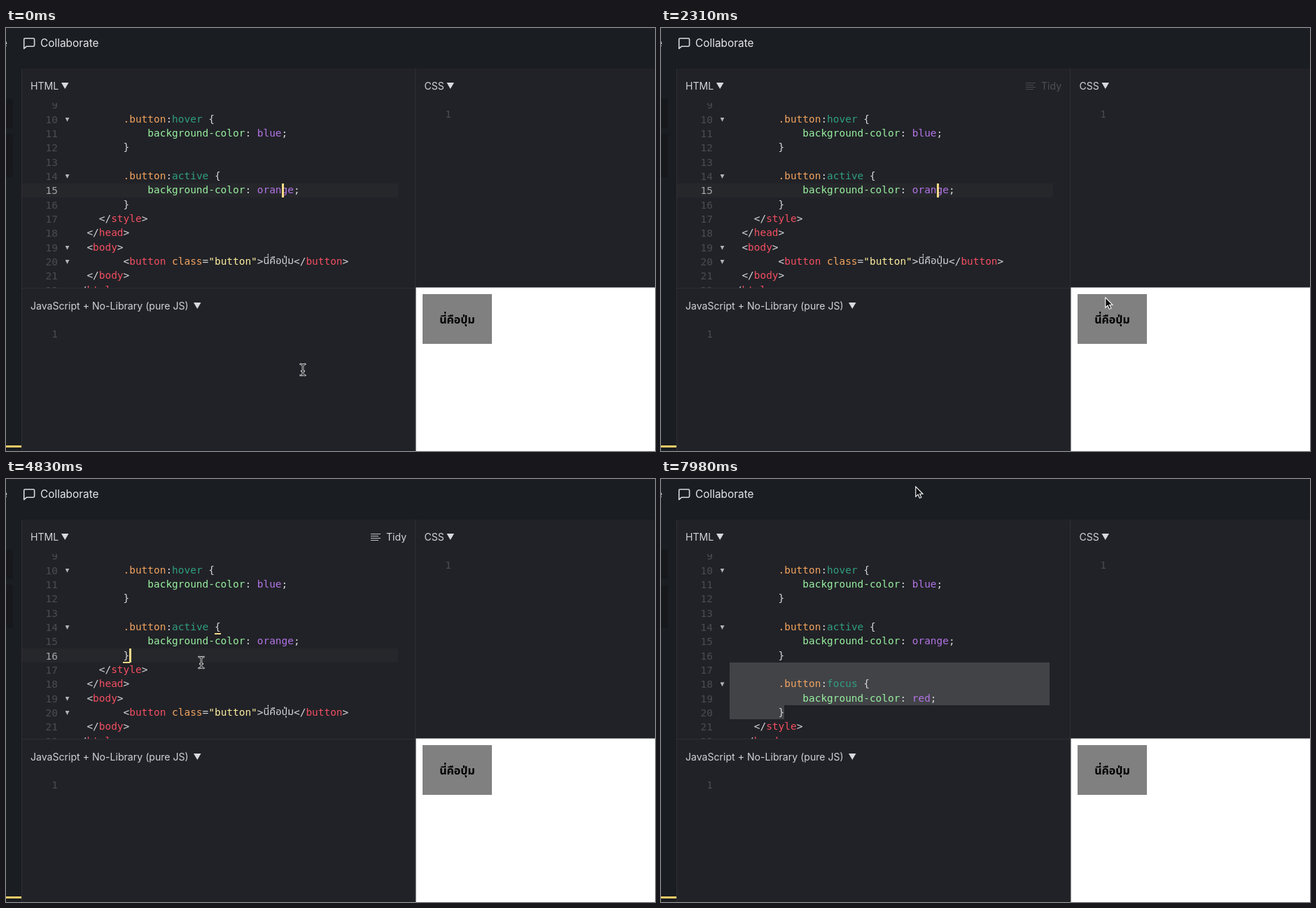
Recreate the animation shown at these times as an HTML page. Size 927 by 604 pixels, loop 8000 ms.

```html
<!DOCTYPE html>
<html lang="en">
<head>
<meta charset="utf-8">
<title>Button states in a code editor</title>
<style>
  html, body { margin: 0; width: 100%; height: 100%; overflow: hidden; background: #1a1d21; }
  #stage { position: relative; width: 927px; height: 604px; overflow: hidden; background: #1a1d21;
    font: 14.1px/20px Inter, "Open Sans", sans-serif; color: #d2d3d7; }
  #stage div, #stage svg { position: absolute; }
  .pane { background: #212227; }
  .rule { background: #2e2f34; }
  .label { white-space: pre; }
  .code, .num { font: 14.44px/20.33px "DejaVu Sans Mono", monospace; white-space: pre; }
  .code { left: 98px; color: #d4d5d9; }
  .num { width: 30px; text-align: right; color: #4b4c51; }
  .num.on { color: #a3a4a8; }
  .clip { left: 0; top: 0; width: 927px; height: 604px; clip-path: inset(107px 343px 233px 23px); }
  .sel { color: #f3a45f; }
  .pse { color: #2f9f83; }
  .prop { color: #98f0a0; }
  .val { color: #b274e6; }
  .tag { color: #f44f62; }
  .str { color: #ffeea0; }
  .thai { font-family: "Noto Sans Thai Looped", "Noto Sans Thai", "Noto Sans", sans-serif; }
  .code .thai { display: inline-block; width: 43.5px; height: 20px; line-height: 20px;
    vertical-align: top; font-size: 14.4px; position: relative; }
  .gold { background: #f8da88; }
  .shade { background: #424347; }
  #button { left: 595px; top: 380px; width: 99px; height: 71px; line-height: 73px;
    text-align: center; color: #000; font-size: 16px; font-weight: 600; }
</style>
</head>
<body>
<div id="stage">
  <div class="label" style="left:-7px;top:12px;font-size:15.4px">e</div>
  <svg width="60" height="58" style="left:0;top:0" fill="none" stroke="#d8d9dc" stroke-width="1.6" stroke-linejoin="round">
    <path d="M27.3 14.8H39Q40.6 14.8 40.6 16.4V24.6Q40.6 26.2 39 26.2H29.6L25.7 29.4V16.4Q25.7 14.8 27.3 14.8Z"/>
  </svg>
  <div class="label" style="left:49px;top:12px;font-size:15.4px;color:#e6e7e9">Collaborate</div>

  <div style="left:-6px;top:101px;width:16px;height:42px;border-radius:4px;background:#16181b"></div>
  <div style="left:-6px;top:151px;width:16px;height:62px;border-radius:4px;background:#16181b"></div>
  <div style="left:0;top:596px;width:22px;height:3px;background:#f3cb66"></div>

  <div class="pane" style="left:23px;top:58px;width:904px;height:546px"></div>
  <div class="rule" style="left:22px;top:58px;width:1px;height:546px"></div>
  <div class="rule" style="left:584px;top:58px;width:1px;height:546px"></div>
  <div class="rule" style="left:22px;top:371px;width:563px;height:1px"></div>

  <div class="label" style="left:35px;top:73px">HTML</div>
  <div class="label" style="left:597.5px;top:73px">CSS</div>
  <div class="label" style="left:35px;top:387px">JavaScript + No-Library (pure JS)</div>
  <svg width="927" height="604" style="left:0;top:0" fill="#d8d9dc">
    <path d="M79 78h10.5l-5.25 9zM629.5 78h10.5l-5.25 9zM268 392h10.5l-5.25 9z"/>
  </svg>
  <div id="tidy">
    <svg width="16" height="12" style="left:521px;top:77px" stroke="#c2c3c7" stroke-width="1.2">
      <path d="M0 1.5h14M0 4.5h11M0 7.5h14M0 10.5h11"/>
    </svg>
    <div class="label" style="left:543px;top:73px">Tidy</div>
  </div>
  <div class="num" style="left:44px;top:427px">1</div>
  <div class="num" style="left:606px;top:113px">1</div>

  <div class="clip" id="editor">
    <div id="active" style="left:23px;width:537px;height:20px;background:#26272b"></div>
    <div id="selection">
      <div class="shade" style="left:98px;top:262px;width:457px;height:60.5px"></div>
      <div class="shade" style="left:98px;top:322px;width:78px;height:21px"></div>
    </div>
    <div id="common"></div>
    <div id="before"></div>
    <div id="after"></div>
    <div id="brackets">
      <div class="gold" style="left:298px;top:219.5px;width:9px;height:2px"></div>
      <div class="gold" style="left:167px;top:260.5px;width:9.5px;height:2px"></div>
    </div>
    <div id="caret" class="gold" style="width:3px;height:20px"></div>
  </div>

  <svg width="927" height="604" style="left:0;top:0"><path d="M585.5 370.5H927V604H585.5Z" fill="#fff"/></svg>
  <div id="button"><span class="thai">นี่คือปุ่ม</span></div>

  <svg id="ring" width="48" height="48" viewBox="-24 -24 48 48" style="left:623.5px;top:395.5px" fill="none">
    <circle r="21" stroke="#fff" stroke-opacity=".55" stroke-width="4"/>
    <circle r="21" stroke="#15151a" stroke-width="1.8"/>
  </svg>
  <svg id="arrow" width="14" height="20" style="left:0;top:0">
    <path d="M.8 .9V15.2L4.1 12.2L6.4 17.4L8.9 16.3L6.6 11.3H11Z" fill="#0c0c0e" stroke="#fff" stroke-width="1.1"/>
  </svg>
  <svg id="beam" width="14" height="22" viewBox="-7 -11 14 22" style="left:-7px;top:-11px" fill="none" stroke-linecap="round">
    <defs><path id="bar" d="M-3.3-8Q0-8 0-5.5Q0-8 3.3-8M0-6V6M-3.3 8Q0 8 0 5.5Q0 8 3.3 8M-1.8 2H1.8"/></defs>
    <use href="#bar" stroke="#fff" stroke-width="2.6"/>
    <use href="#bar" stroke="#17181c" stroke-width="1.2"/>
  </svg>
</div>
<script>
const LOOP = 8000, STEP = 70, LINE = 20.33;
const $ = id => document.getElementById(id);
const lineTop = n => 120.2 + (n - 10) * LINE;
const span = (kind, text) => `<span class="${kind}">${text}</span>`;

function add(parent, kind, style, html) {
  const el = document.createElement('div');
  el.className = kind;
  el.style.cssText = style;
  el.innerHTML = html;
  $(parent).append(el);
  return el;
}
const code = (parent, n, indent, html) =>
  add(parent, 'code', `top:${lineTop(n) - 0.6}px`, ' '.repeat(indent) + html);
const fold = (parent, n) =>
  add(parent, '', `left:84.5px;top:${lineTop(n) + 7.5}px;width:6px;height:6px;background:#b2b3b7;clip-path:polygon(0 0,100% 0,50% 100%)`, '');

function rule(parent, n, state, color) {
  fold(parent, n).id = 'fold-' + state;
  code(parent, n, 8, span('sel', '.button') + ':' + span('pse', state) + ' {');
  code(parent, n + 1, 12, span('prop', 'background-color') + ': ' + span('val', color) + ';');
  code(parent, n + 2, 8, '}');
}
const open = name => '&lt;' + span('tag', name);
const close = name => '&lt;/' + span('tag', name) + '&gt;';

const nums = {};
for (let n = 9; n <= 22; n++)
  nums[n] = add('editor', 'num', `left:44px;top:${lineTop(n) + 0.6}px`, n);

rule('common', 10, 'hover', 'blue');
rule('common', 14, 'active', 'orange');
code('before', 17, 4, close('style'));
code('before', 18, 2, close('head'));
fold('before', 19);
code('before', 19, 2, open('body') + '&gt;');
fold('before', 20);
code('before', 20, 8, open('button') + ' ' + span('sel', 'class') + '=' + span('str', '"button"') +
  '&gt;' + span('thai', 'นี่คือปุ่ม') + close('button'));
code('before', 21, 2, close('body'));
code('before', 22, 0, close('html'));
rule('after', 18, 'focus', 'red');
code('after', 21, 4, close('style'));
code('after', 22, 2, close('head'));

// Pointer path: time, x, y
const path = [
  [0, 424, 488], [70, 424, 488], [350, 426, 482], [490, 422, 476], [770, 345, 290],
  [980, 272, 146], [1120, 267, 132], [1330, 256, 130], [1540, 290, 140], [1750, 330, 165],
  [1960, 440, 230], [2100, 545, 295], [2310, 634, 384], [2520, 648, 418],
  [4130, 648, 418], [4270, 600, 385], [4480, 390, 296], [4690, 279, 262],
  [5810, 279, 262], [5880, 289, 274], [6090, 385, 310], [6230, 405, 345], [6370, 340, 300],
  [6510, 260, 190], [6650, 241, 86], [6790, 241, 86], [7909, 241, 86], [7910, 348, 40], [7980, 363, 10]
];
function pointer(t) {
  const i = path.findIndex(p => p[0] > t);
  if (i < 0) return path[path.length - 1].slice(1);
  const [t0, x0, y0] = path[i - 1], [t1, x1, y1] = path[i];
  const k = (t - t0) / (t1 - t0);
  return [x0 + (x1 - x0) * k, y0 + (y1 - y0) * k];
}
const ramp = (t, from, to) => Math.min(1, Math.max(0, (t - from) / (to - from)));
const show = (id, on) => { $(id).style.visibility = on ? 'visible' : 'hidden'; };

function draw(t) {
  const [x, y] = pointer(t);
  const isArrow = x > 585 || y < 58;
  const visible = t < 6790 || t >= 7910;
  show('arrow', visible && isArrow);
  show('beam', visible && !isArrow);
  $('arrow').style.transform = $('beam').style.transform = `translate(${x}px,${y}px)`;

  $('tidy').style.opacity = ramp(t, 630, 910) - ramp(t, 2130, 2370) + ramp(t, 4270, 4550) - ramp(t, 6650, 6860);

  const pressed = t >= 3045 && t < 4130;
  const hover = t >= 2380 && t < 4270;
  $('button').style.background = pressed ? '#ffa500' : hover ? '#0000ff' : '#808080';
  show('ring', t >= 3010 && t < 4130);

  const row = t < 3010 ? 15 : t >= 4690 && t < 5110 ? 16 : 0;
  show('active', row);
  show('caret', row);
  show('brackets', row === 16);
  for (const n in nums) nums[n].classList.toggle('on', +n === row);
  if (row) {
    $('active').style.top = $('caret').style.top = lineTop(row) + 'px';
    $('caret').style.left = (row === 15 ? 394 : 176) + 'px';
  }

  const pasted = t >= 5110;
  show('before', !pasted);
  show('after', pasted);
  show('selection', pasted);
  show('fold-focus', t >= 5530);
}

const start = performance.now();
function tick() {
  const t = (performance.now() - start) % LOOP;
  draw(Math.floor(t / STEP) * STEP);
  requestAnimationFrame(tick);
}
draw(0);
tick();
</script>
</body>
</html>
```
